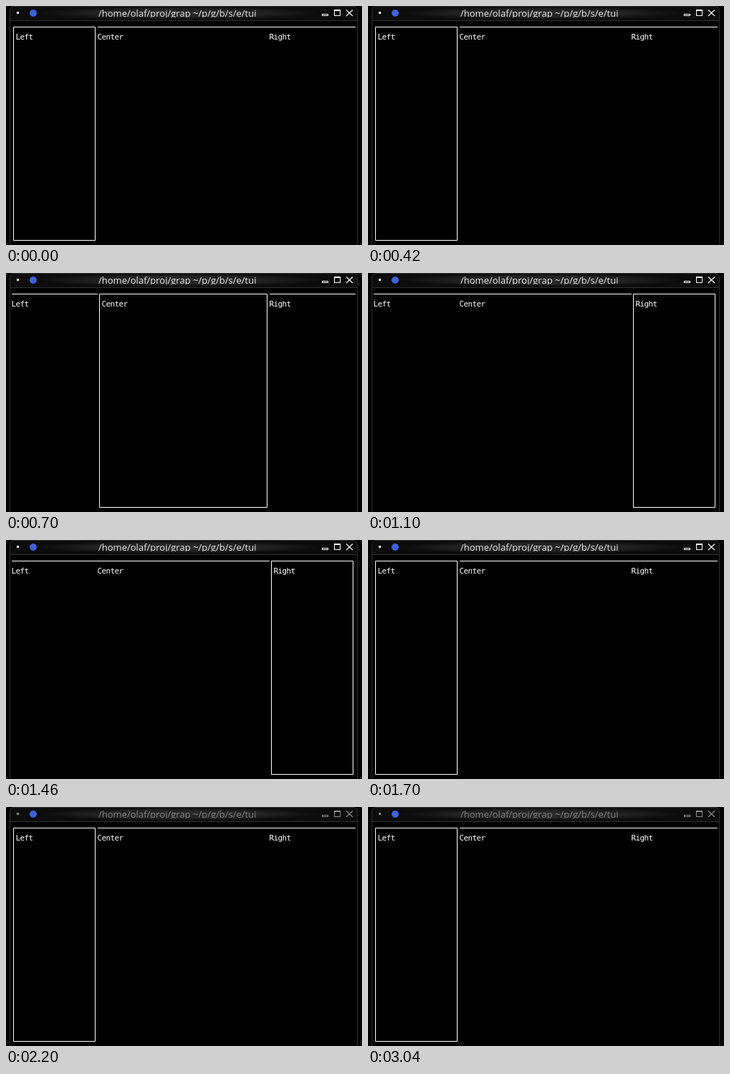
Recreate the animation shown at these times as an HTML page. Size 497 by 335 pixels, loop 3600 ms.

```html
<!DOCTYPE html>
<html>
<head>
<meta charset="utf-8">
<style>
  html, body { margin: 0; width: 100%; height: 100%; overflow: hidden; background: #000; }
  svg { display: block; }
  .title { font: 13px "Open Sans", "Noto Sans", sans-serif; }
  .pane text { font: 11px "DejaVu Sans Mono", monospace; letter-spacing: -.62px; fill: #fff; }
  .pane path { fill: none; stroke: #fff; }
</style>
</head>
<body>
<svg width="497" height="335" viewBox="0 0 497 335">
  <defs>
    <radialGradient id="glow" cx=".5" cy=".5" r=".5">
      <stop offset="0" stop-color="#2c2c2c"/>
      <stop offset=".6" stop-color="#222"/>
      <stop offset="1" stop-color="#0c0c0c"/>
    </radialGradient>
    <clipPath id="bar"><rect width="497" height="16"/></clipPath>
  </defs>

  <!-- window frame -->
  <path d="M6 20V7Q6 0 13 0H483Q490 0 490 7V20Z" fill="#0c0c0c"/>
  <rect x="45" y="1" width="395" height="18" fill="url(#glow)"/>
  <path d="M5.5 335V7Q5.5 .5 12 .5H484Q490.5 .5 490.5 7V335M6 20.5H490" fill="none" stroke="#303030"/>

  <!-- title bar -->
  <circle cx="38" cy="10" r="5" fill="#3f62d8"/>
  <g id="chrome" fill="#fff" stroke="none">
    <rect x="15" y="8" width="3" height="3"/>
    <g clip-path="url(#bar)">
      <text class="title" x="129" y="15" opacity=".9">/home/olaf/proj/grap ~/p/g/b/s/e/tui</text>
    </g>
    <path d="M441 11h9v3h-9zM442 12v1h7v-1zM458 5h9v9h-9zM459 7v6h7v-6z" fill-rule="evenodd"/>
    <path id="close" d="M475 5.5l9 8.5M484 5.5l-9 8.5" stroke="#fff" stroke-width="1.1"/>
  </g>

  <g id="panes"></g>
</svg>
<script>
const $ = id => document.getElementById(id);
const TOP = 29.5, BOTTOM = 328.5, LOOP = 3600;
const names = ['Left', 'Center', 'Right'];
const edges = [8, 128, 368, 488];
// [start time, focused pane]
const steps = [[0, 0], [700, 1], [1100, 2], [1700, 0]];
const BLUR_AT = 2200;

$('panes').innerHTML = names.map(name =>
  `<g class="pane"><path/><text y="47">${name}</text></g>`).join('');
const panes = [...document.querySelectorAll('.pane')];

function drawPane(pane, i, focused) {
  const left = edges[i], right = edges[i + 1];
  const [path, label] = pane.children;
  path.setAttribute('d', focused
    ? `M${left + 2.5} ${TOP}H${right - 3.5}V${BOTTOM}H${left + 2.5}Z`
    : `M${left} ${TOP}H${right}`);
  label.setAttribute('x', left - .6 + (focused ? 6 : 0));
}

function frame() {
  const t = performance.now() % LOOP;
  const focus = steps.filter(([start]) => t >= start).pop()[1];
  panes.forEach((pane, i) => drawPane(pane, i, i === focus));
  const tone = t < BLUR_AT ? '#fff' : '#8c8c8c';
  $('chrome').setAttribute('fill', tone);
  $('close').setAttribute('stroke', tone);
  requestAnimationFrame(frame);
}
frame();
</script>
</body>
</html>
```
